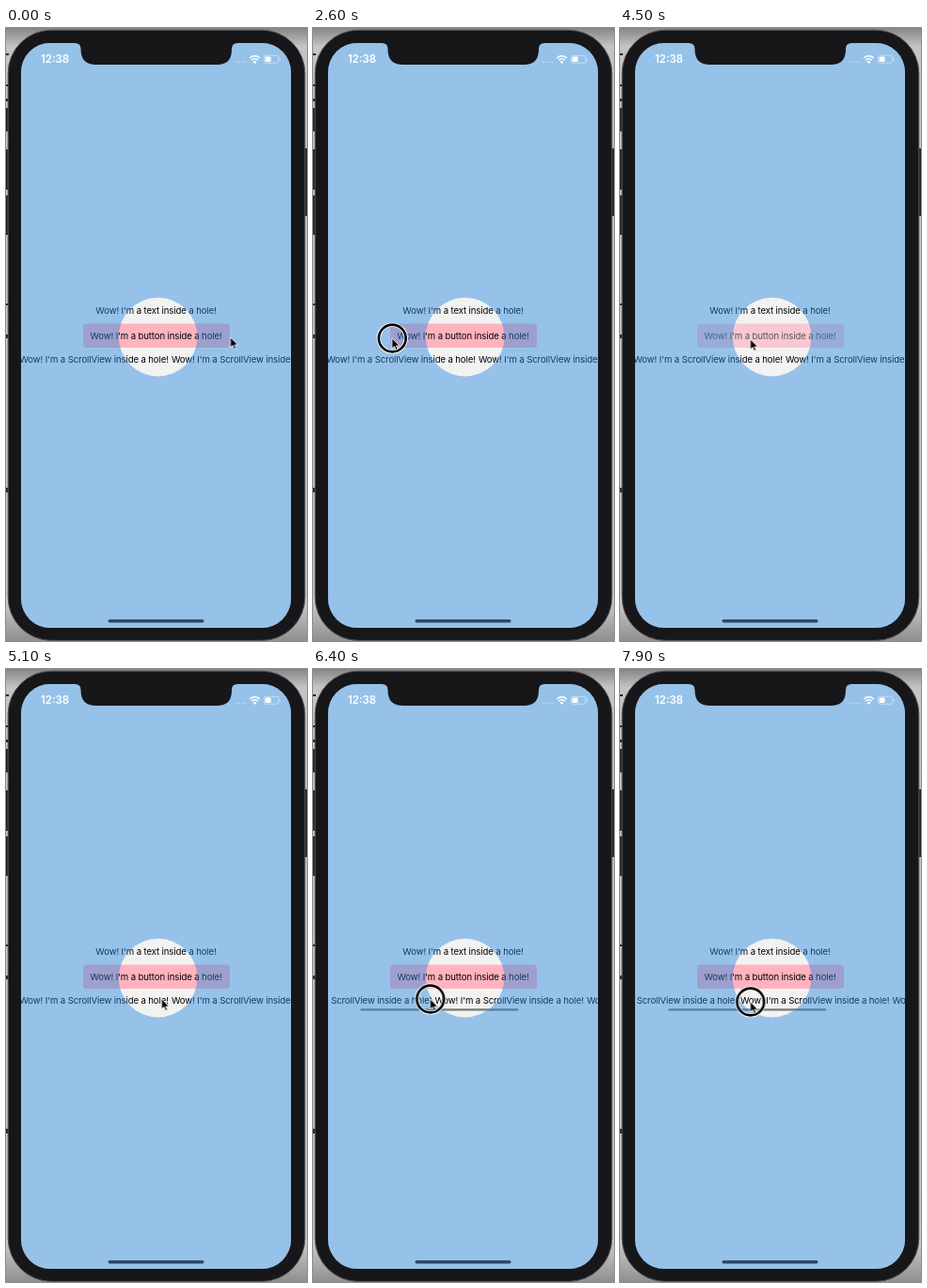
These frames come from a looping animation (320 px wide and 652 px high, 8000 ms). An HTML page:

```html
<!DOCTYPE html>
<html lang="en">
<head>
<meta charset="utf-8">
<title>Hole view demo</title>
<style>
  html, body { margin: 0; width: 100%; height: 100%; overflow: hidden; background: #d4d4d5; }
  svg { display: block; width: 320px; height: 652px; }
  text { font: 9.6px Inter, Roboto, sans-serif; letter-spacing: -.12px; fill: #000; }
  .mid { text-anchor: middle; }
  .clock { font-size: 11.4px; font-weight: 600; letter-spacing: 0; fill: #fff; }
</style>
</head>
<body>
<svg viewBox="0 0 320 652">
  <defs>
    <clipPath id="screen"><rect x="16" y="16" width="287" height="622" rx="31"/></clipPath>
    <linearGradient id="shade" x2="0" y2="1">
      <stop offset="0" stop-color="#858586"/>
      <stop offset=".03" stop-color="#c4c4c5"/>
      <stop offset=".5" stop-color="#c9c9ca"/>
      <stop offset=".94" stop-color="#c6c6c7"/>
      <stop offset="1" stop-color="#8f8f90"/>
    </linearGradient>
  </defs>

  <!-- desktop behind the device -->
  <rect width="320" height="652" fill="url(#shade)"/>
  <g id="desk" fill="#242426"></g>

  <!-- device -->
  <rect x="2.2" y="2.2" width="315.6" height="649.2" rx="46" fill="#17171a" stroke="#555557"/>

  <g clip-path="url(#screen)">
    <rect x="16" y="16" width="287" height="622" fill="#f2f2f2"/>
    <text class="mid" x="159.5" y="304.2">Wow! I'm a text inside a hole!</text>
    <g id="button">
      <rect x="82" y="314.5" width="156" height="25.5" rx="3.5" fill="#ffb3c0"/>
      <text class="mid" x="159.5" y="330.8">Wow! I'm a button inside a hole!</text>
    </g>
    <g id="row"></g>
    <rect id="bar" x="22.8" y="361.3" width="168" height="2.2" rx="1.1" fill="#000" fill-opacity=".5"/>
    <path fill="#2688de" fill-opacity=".45" fill-rule="evenodd"
      d="M16 16H303V638H16ZM119.8 328.6a41.8 41.8 0 1 0 83.6 0a41.8 41.8 0 1 0 -83.6 0Z"/>
    <rect x="108.5" y="629" width="102" height="3.6" rx="1.8" fill="#2f4a66"/>
  </g>

  <path fill="#17171a" d="M73 15V16Q79.5 16 79.5 22C79.5 34 85 39 96 39H224C235 39 240 34 240 22Q240 16 246.5 16V15Z"/>

  <!-- status bar -->
  <text class="clock" x="37" y="37.4">12:38</text>
  <g fill="#fff">
    <g id="dots" fill-opacity=".5"></g>
    <path d="M264.5 38l-1.9-2.1a2.7 2.7 0 0 1 3.8 0Z"/>
    <path fill="none" stroke="#fff" stroke-width="1.5" d="M261.1 34.2a4.8 4.8 0 0 1 6.8 0M259.2 32a7.6 7.6 0 0 1 10.6 0"/>
    <rect x="274.4" y="29.3" width="15.4" height="8" rx="2.2" fill="none" stroke="#fff" stroke-opacity=".55" stroke-width=".8"/>
    <rect x="275.6" y="30.5" width="6" height="5.6" rx="1"/>
    <rect x="290.6" y="32" width="1" height="2.8" rx=".5" fill-opacity=".55"/>
  </g>

  <g id="pointer">
    <g id="ring" fill="none">
      <circle cx=".3" r="14.4" stroke="#fff" stroke-width="4.4"/>
      <circle cx=".3" r="14.4" stroke="#000" stroke-width="2.6"/>
    </g>
    <path d="M0 0V11L2.6 8.6L4.3 12.4L6.2 11.6L4.5 8H8Z" fill="#000" stroke="#fff" stroke-width=".8" stroke-linejoin="round"/>
  </g>
</svg>

<script>
const LOOP = 8000;
const PERIOD = 161.5;
const $ = id => document.getElementById(id);

function add(parent, tag, attrs, text = '') {
  const el = document.createElementNS('http://www.w3.org/2000/svg', tag);
  for (const key in attrs) el.setAttribute(key, attrs[key]);
  el.textContent = text;
  parent.append(el);
}

// x, y, height of the dark window pieces
for (const [x, y, height] of [
  [0, 27, 2], [0, 60, 2], [0, 75, 3], [0, 85, 25], [0, 129, 43], [0, 178, 42],
  [0, 293, 2], [0, 326, 4], [0, 489, 5], [317, 128, 72]
]) add($('desk'), 'rect', { x, y, width: 3, height });

for (let i = 0; i < 4; i++) add($('dots'), 'circle', { cx: 244.8 + i * 3.1, cy: 36.2, r: .8 });

for (let i = 0; i < 3; i++) {
  add($('row'), 'text', { x: 14.5 + i * PERIOD, y: 356.2 }, "Wow! I'm a ScrollView inside a hole!");
}

// Each step is [time, ...values]; the last value holds until the loop ends.
function play(id, steps, toStyle, easing) {
  const frames = [...steps, [LOOP, ...steps.at(-1).slice(1)]]
    .map(([time, ...values]) => ({ offset: time / LOOP, easing, ...toStyle(...values) }));
  $(id).animate(frames, { duration: LOOP, iterations: Infinity });
}

const move = (x, y = 0) => ({ transform: `translate(${x}px, ${y}px)` });
const fade = opacity => ({ opacity });

play('pointer', [
  [0, 238.5, 329], [150, 238, 329], [600, 226, 328], [1300, 226, 328],
  [2200, 84, 330], [3300, 84, 330], [4000, 138.5, 331], [4600, 138.5, 331],
  [5200, 167, 352], [5400, 167, 352], [5900, 131, 352],
  [6900, 118, 350], [7900, 138.5, 354]
], move, 'ease-in-out');

play('ring', [
  [0, 0], [700, 1], [1000, 0], [2500, 1], [2700, 0], [3000, 1], [3200, 0],
  [4200, 1], [4400, 0], [5300, 1]
], fade, 'step-end');

play('button', [[0, 1], [4200, 1], [4300, .2], [4400, .2], [4500, .65], [4650, 1]], fade, 'linear');

const scroll = [[0, 0], [5400, 0], [5900, 36], [6900, 57], [7900, 48]];
play('row', scroll, x => move(-x), 'ease-in-out');
play('bar', scroll, x => move(x * .59), 'ease-in-out');
$('bar').animate(
  [{ opacity: 0 }, { opacity: 0, offset: .675 }, { opacity: 1, offset: .69 }, { opacity: 1 }],
  { duration: LOOP, iterations: Infinity }
);
</script>
</body>
</html>
```
